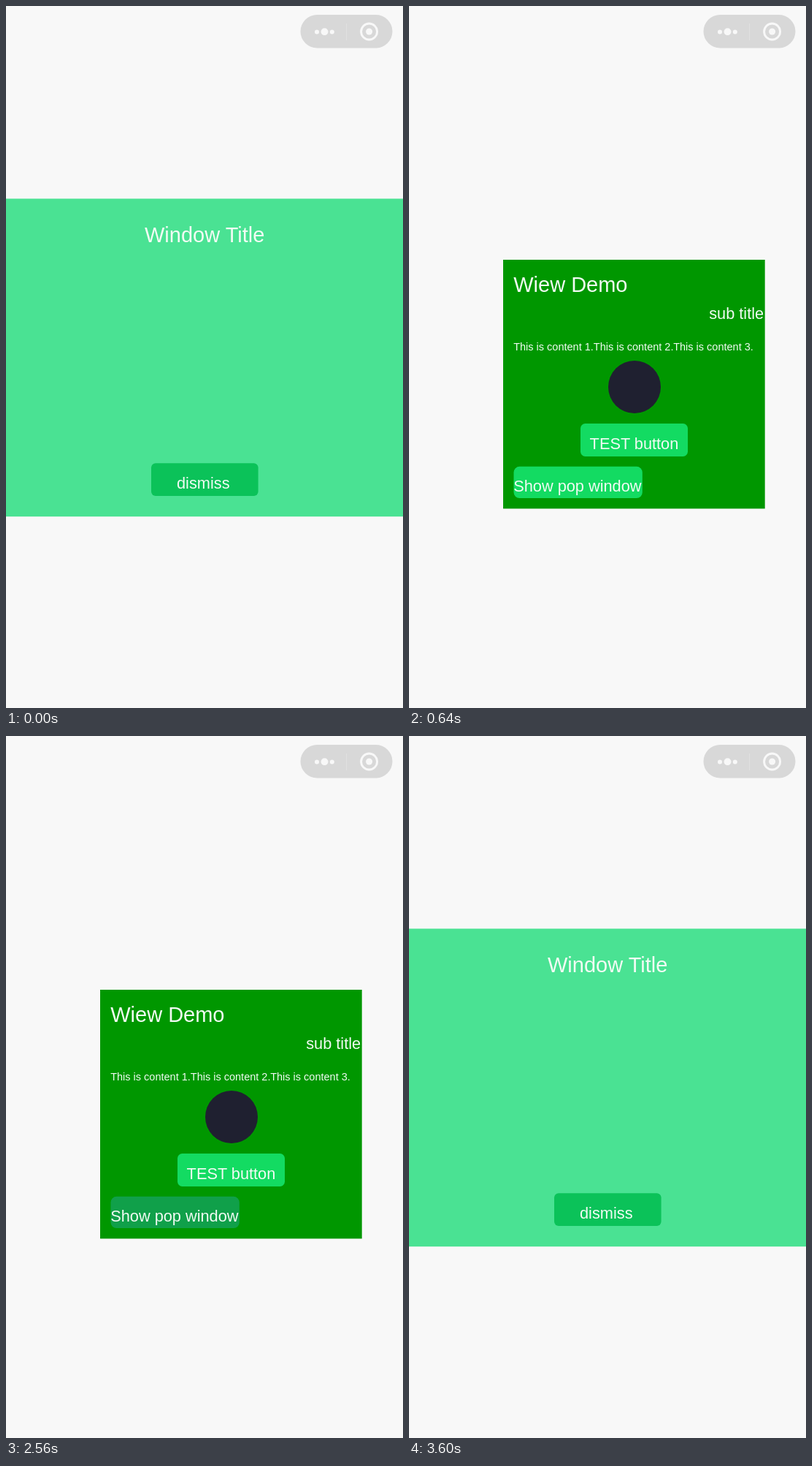
Animation, 544 px wide and 960 px high, one loop 3.68 s. Source, as an HTML page:

```html
<!DOCTYPE html>
<html lang="en">
<head>
<meta charset="utf-8">
<title>Pop window demo</title>
<style>
  html, body { margin: 0; width: 100%; height: 100%; overflow: hidden; background: #f8f8f8; }
  svg { display: block; width: 100%; height: 100%; }
  text { font-family: "Liberation Sans", Arial, sans-serif; font-size: 21.75px; fill: #f2fbf4; }
  .title { font-size: 29px; }
  .small { font-size: 14.5px; }
  .button { fill: #13db62; }

  .page, .popup, .show, .dismiss { animation: 3680ms step-end infinite; }
  .page { animation-name: page; }
  .popup { animation-name: popup; }
  .show { animation-name: show; }
  .dismiss { animation-name: dismiss; }

  /* page is open from 80 ms to 2640 ms, the popup the rest of the time */
  @keyframes page {
    0% { visibility: hidden; }
    2.1739% { visibility: visible; }
    71.7391%, 100% { visibility: hidden; }
  }
  @keyframes popup {
    0% { visibility: visible; }
    2.1739% { visibility: hidden; }
    71.7391%, 100% { visibility: visible; }
  }
  /* pressed states */
  @keyframes show {
    0% { fill: #13db62; }
    65.2174% { fill: #10a04a; }
    71.7391%, 100% { fill: #13db62; }
  }
  @keyframes dismiss {
    0% { fill: #0bc259; }
    2.1739% { fill: #13db62; }
    91.3043%, 100% { fill: #0bc259; }
  }
</style>
</head>
<body>
<svg viewBox="0 0 544 960">
  <rect width="544" height="960" fill="#f8f8f8"/>

  <g class="capsule" fill="#f8f8f8">
    <rect x="403.5" y="12" width="126" height="45.5" rx="22.75" fill="#d8d8d8"/>
    <circle cx="426" cy="35.5" r="3"/>
    <circle cx="436.5" cy="35.2" r="4.9"/>
    <circle cx="446.8" cy="35.5" r="3"/>
    <rect x="466" y="24" width="1" height="23" fill="#e0e0e0"/>
    <circle cx="497.6" cy="35" r="11" fill="none" stroke="#f8f8f8" stroke-width="2.9"/>
    <circle cx="497.6" cy="35" r="4.5"/>
  </g>

  <g class="page">
    <rect x="129" y="347" width="358.7" height="340.4" fill="#009700"/>
    <text class="title" x="143.2" y="391">Wiew Demo</text>
    <text x="411.2" y="427.5">sub title</text>
    <g>
      <text class="small" x="143.2" y="471">This is content 1.</text>
      <text class="small" x="252.8" y="471">This is content 2.</text>
      <text class="small" x="362.2" y="471">This is content 3.</text>
    </g>
    <circle cx="309" cy="521" r="36" fill="#1f2030"/>
    <rect class="button" x="235" y="571" width="147" height="45" rx="6.5"/>
    <text x="247.6" y="606">TEST button</text>
    <rect class="button show" x="143.5" y="629.8" width="176.3" height="43.2" rx="8"/>
    <text x="143.2" y="664">Show pop window</text>
  </g>

  <g class="popup">
    <rect y="263.5" width="544" height="434.7" fill="#4ae293"/>
    <text class="title" x="190" y="323">Window Title</text>
    <rect class="button dismiss" x="199" y="625.3" width="146.6" height="44.8" rx="6"/>
    <text x="234" y="659.5">dismiss</text>
  </g>
</svg>
</body>
</html>
```
